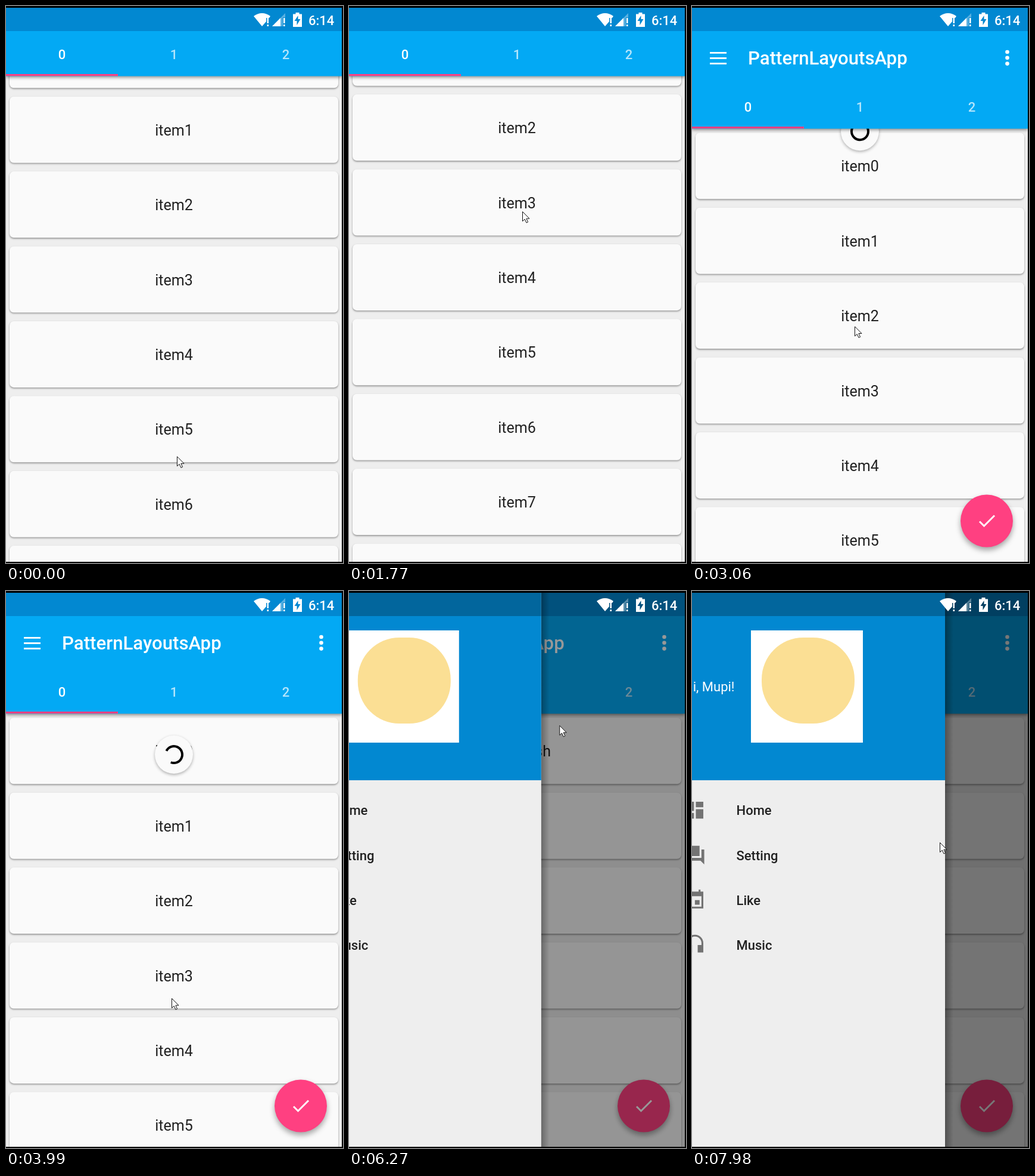
Recreate the animation shown at these times as an HTML page with a canvas. Size 566x933 px, loop 8 s.

```html
<!DOCTYPE html>
<html lang="en">
<head>
<meta charset="utf-8">
<title>Scrolling list with drawer</title>
<style>
  html, body { margin: 0; width: 100%; height: 100%; overflow: hidden; background: #000; }
  canvas { display: block; width: 566px; height: 933px; }
</style>
</head>
<body>
<canvas id="stage" width="566" height="933"></canvas>
<script>
const ctx = document.getElementById('stage').getContext('2d');
const LOOP = 8000, RIGHT = 564, BOTTOM = 931, BAR = 88, PITCH = 125.4, DRAWER = 439;
const BLUE = '#03a9f4', DARK_BLUE = '#0288d1', PINK = '#ff4081', INK = '#212121';

// Each key is [time, value, ...]; values between keys are interpolated.
const tracks = {
  cursor: [[0, 287, 754], [120, 283, 783], [270, 283, 783], [800, 286, 490], [1600, 291, 344],
    [1800, 291, 344], [1860, 285, 376], [1890, 278, 440], [2130, 240, 678], [2250, 240, 690],
    [2640, 268, 390], [2730, 268, 390], [3390, 278, 682], [4300, 278, 682], [5100, 55, 231],
    [5160, 38, 196], [5330, 38, 196], [5520, 2, 175], [5760, 2, 175], [5880, 65, 184],
    [6120, 240, 205], [6400, 450, 242], [6540, 490, 250], [7290, 539, 300], [7460, 539, 300],
    [7860, 433, 415], [7980, 416, 421]],
  scroll: [[800, 98], [1050, 155], [1600, 227], [1890, 227], [2100, 95], [2760, 95], [2970, 0]],
  bar: [[1820, 0], [1860, 20], [1890, BAR]],
  fab: [[1890, 0], [2070, 1]],
  pull: [[2970, 172], [3390, 348], [3480, 348], [3690, 274]],
  spinnerSize: [[4080, 1], [4230, 0]],
  drawer: [[5900, 0], [6120, 205], [6420, DRAWER], [7880, DRAWER], [7980, 425]],
  ripple: [[5770, 4, 8], [5880, 53, 54], [6060, 94, 105]],
  rippleAlpha: [[5940, .14], [6060, 0]]
};

function at(name, time) {
  const keys = tracks[name];
  const next = keys.findIndex(key => key[0] > time);
  if (next === 0) return keys[0].slice(1);
  if (next < 0) return keys[keys.length - 1].slice(1);
  const from = keys[next - 1], to = keys[next];
  const part = (time - from[0]) / (to[0] - from[0]);
  return from.slice(1).map((value, i) => value + (to[i + 1] - value) * part);
}

function rect(x, y, width, height, color) {
  ctx.fillStyle = color;
  ctx.fillRect(x, y, width, height);
}

function circle(x, y, radius, color) {
  ctx.fillStyle = color;
  ctx.beginPath();
  ctx.arc(x, y, radius, 0, 7);
  ctx.fill();
}

function path(data, color, stroke) {
  const shape = new Path2D(data);
  if (stroke) {
    ctx.strokeStyle = color;
    ctx.lineWidth = stroke;
    ctx.stroke(shape);
  } else {
    ctx.fillStyle = color;
    ctx.fill(shape, 'evenodd');
  }
}

function text(label, x, y, size, color, align = 'left', weight = 500) {
  ctx.font = `${weight} ${size}px Roboto, sans-serif`;
  ctx.textAlign = align;
  ctx.fillStyle = color;
  ctx.fillText(label, x, y);
}

function withShadow(blur, offset, alpha, draw) {
  ctx.save();
  ctx.shadowColor = `rgba(0,0,0,${alpha})`;
  ctx.shadowBlur = blur;
  ctx.shadowOffsetY = offset;
  draw();
  ctx.restore();
}

function placed(x, y, scale, draw) {
  ctx.save();
  ctx.translate(x, y);
  ctx.scale(scale, scale);
  draw();
  ctx.restore();
}

function drawList(time, bar) {
  const [scroll] = at('scroll', time);
  const refreshed = time >= 4060;
  for (let i = 0; i < 10; i++) {
    const top = 124.3 + bar + i * PITCH - scroll;
    if (top > BOTTOM) break;
    withShadow(3, 1.6, .38, () => {
      ctx.fillStyle = '#fafafa';
      ctx.beginPath();
      ctx.roundRect(6, top, 552, 111, 7);
      ctx.fill();
    });
    const label = !refreshed ? 'item' + i : i ? 'item' + (i - 1) : 'onRefresh';
    text(label, 282, top + 65, 25.1, INK, 'center', 400);
  }
}

function drawSpinner(time) {
  const [y] = at('pull', time), [size] = at('spinnerSize', time);
  if (time < 2970 || size <= 0) return;
  placed(282, y, size, () => {
    withShadow(5, 2, .3, () => circle(0, 0, 32, '#fafafa'));
    ctx.rotate((time - 3990) * .0047);
    ctx.strokeStyle = '#000';
    ctx.lineWidth = 4;
    ctx.beginPath();
    ctx.arc(0, 0, 14, -2.7, 1.95);
    ctx.stroke();
  });
}

function drawAppBar(time, bar) {
  const bottom = 117.5 + bar;
  withShadow(5, 2, .4, () => rect(0, 42, RIGHT, bottom - 42, BLUE));
  const y = bar - BAR;
  for (let i = 0; i < 3; i++) {
    rect(30, 77 + i * 9 + y, 28, 2.8, '#fff');
    circle(529.5, 77 + i * 9.8 + y, 3.3, '#fff');
  }
  text('PatternLayoutsApp', 94, 98 + y, 31.2, '#fff');

  const [alpha] = at('rippleAlpha', time);
  if (time > 5770 && alpha > 0) {
    const [x, radius] = at('ripple', time);
    ctx.save();
    ctx.beginPath();
    ctx.rect(0, bottom - 75.5, 188, 75.5);
    ctx.clip();
    circle(x, bottom - 38, radius, `rgba(255,255,255,${alpha})`);
    ctx.restore();
  }
  for (let i = 0; i < 3; i++) {
    text(i, 94 + i * 188, bottom - 28.5, 22, i ? 'rgba(255,255,255,.7)' : '#fff', 'center');
  }
  rect(0, bottom - 3.5, 188, 3.2, PINK);
  rect(0, 3, RIGHT, 39, DARK_BLUE);
}

function drawFab(time) {
  const [size] = at('fab', time);
  if (!size) return;
  placed(495, 862.5, size, () => {
    withShadow(10, 5, .35, () => circle(0, 0, 44, PINK));
    path('M-12 1l7.5 7.5L13 -9', '#fff', 3);
  });
}

const menu = [
  ['Home', 'M3 3h8v10H3zM3 15h8v6H3zM13 3h8v6h-8zM13 11h8v10h-8z'],
  ['Setting', 'M21 6h-2v9H6v3h12l4 4V6zM17 13V2H2v15l4-4z'],
  ['Like', 'M3 3h3V1h2v2h8V1h2v2h3v18H3zM5 8v11h14V8zM12 12h5v5h-5z'],
  ['Music', 'M3 10a9 9 0 0 1 18 0v10h-6v-8h4v-2a7 7 0 0 0-14 0v2h4v8H3z']
];

function drawDrawer(time) {
  const [edge] = at('drawer', time);
  if (!edge) return;
  rect(0, 3, RIGHT, BOTTOM - 3, `rgba(0,0,0,${.55 * edge / DRAWER})`);
  placed(edge - DRAWER, 0, 1, () => {
    const shade = ctx.createLinearGradient(DRAWER, 0, DRAWER + 14, 0);
    shade.addColorStop(0, 'rgba(0,0,0,.3)');
    shade.addColorStop(1, 'rgba(0,0,0,0)');
    rect(DRAWER, 3, 14, BOTTOM - 3, shade);
    rect(0, 3, DRAWER, BOTTOM - 3, '#eee');
    rect(0, 3, DRAWER, 314, DARK_BLUE);
    rect(0, 3, DRAWER, 39, 'rgba(0,0,0,.25)');
    text('Hi, Mupi!', 0, 168, 22, '#fff', 'left', 400);
    rect(113, 66, 188, 188, '#fff');
    ctx.fillStyle = '#fbdf94';
    ctx.beginPath();
    ctx.roundRect(131, 78, 156, 144, 70);
    ctx.fill();
    menu.forEach(([label, icon], i) => {
      const y = 367 + i * 75.3;
      placed(0, y - 18.8, 1.571, () => path(icon, '#737373'));
      text(label, 88.5, y + 8.3, 22, INK);
    });
  });
}

function drawStatusIcons() {
  path('M430 34L416 17Q430 7 444 17L442 20H437V26z', '#fff');
  path('M447 34L469 12V19H465V34z', 'rgba(255,255,255,.35)');
  path('M447 34L461 20V34z', '#fff');
  for (const x of [438.5, 466]) {
    rect(x, 20, 2.5, 9, '#fff');
    rect(x, 31, 2.5, 3, '#fff');
  }
  path('M482 13.5h4.5V11h6v2.5H497V35H482zM490.5 16l-6 9h4v7l6-10h-4z', '#fff');
  text('6:14', 508, 31.5, 22, '#fff');
}

function drawCursor(time) {
  const [x, y] = at('cursor', time);
  placed(x + .5, y + .5, 1, () => {
    const arrow = 'M0 0V16l3.7-3.4 2.8 6 2.6-1.2-2.7-5.8H11.5z';
    path(arrow, '#fff');
    path(arrow, '#111', 1);
  });
}

function draw(time) {
  const [bar] = at('bar', time);
  rect(0, 0, 566, 933, '#000');
  ctx.save();
  ctx.beginPath();
  ctx.rect(0, 3, RIGHT, BOTTOM - 3);
  ctx.clip();
  rect(0, 3, RIGHT, BOTTOM, '#eee');
  drawList(time, bar);
  drawSpinner(time);
  drawAppBar(time, bar);
  drawFab(time);
  drawDrawer(time);
  drawStatusIcons();
  drawCursor(time);
  ctx.restore();
}

const start = performance.now();
function tick() {
  draw((performance.now() - start) % LOOP);
  requestAnimationFrame(tick);
}
tick();
</script>
</body>
</html>
```
